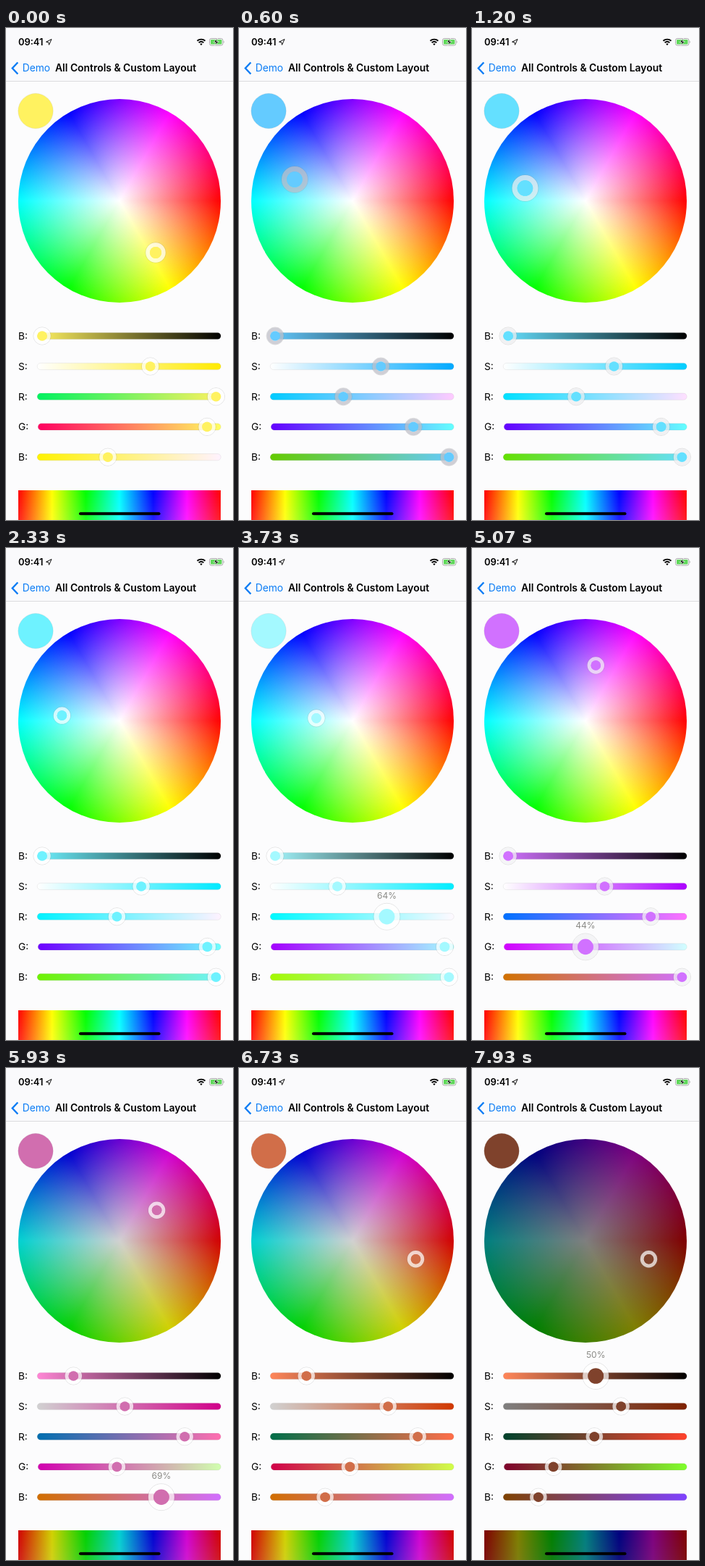
Animation of 314x679 px, one loop 8000 ms. Source, as an HTML page:

```html
<!DOCTYPE html>
<html lang="en">
<head>
<meta charset="utf-8">
<title>Colour controls</title>
<style>
  html, body { margin: 0; width: 100%; height: 100%; overflow: hidden; background: #fcfcfd; }
  div, svg { position: absolute; }
  #wheel {
    left: 16.75px; top: 98.25px; width: 280.5px; height: 280.5px; border-radius: 50%;
    background: radial-gradient(closest-side, #fff, rgba(255, 255, 255, 0)),
      conic-gradient(from 90deg, #f00, #ff0, #0f0, #0ff, #00f, #f0f, #f00);
  }
  #palette {
    left: 16.75px; top: 638px; width: 280.5px; height: 41px;
    background: linear-gradient(rgba(255, 255, 255, 0), rgba(255, 255, 255, .12)),
      linear-gradient(90deg, #f00, #ff0, #0f0, #0ff, #00f, #f0f, #f00);
  }
  svg { left: 0; top: 0; font-family: Inter, Roboto, sans-serif; }
</style>
</head>
<body>
<div id="wheel"></div>
<div id="palette"></div>
<svg id="screen" width="314" height="679" viewBox="0 0 314 679">
  <defs id="defs"></defs>
  <rect width="314" height="73" fill="#fafafc"/>
  <text x="17" y="24" font-size="12.9" font-weight="600">09:41</text>
  <path d="M55.5 19.2 63 15.5 59.5 23.3 58.8 19.8Z" fill="none" stroke="#111" stroke-linejoin="round"/>
  <g fill="none" stroke="#000" stroke-width="1.9">
    <path d="M264.5 17.8a8 8 0 0 1 11 0M266.7 20.3a5 5 0 0 1 6.6 0"/>
    <path d="M268.3 22 270 24 271.7 22A2.6 2.6 0 0 0 268.3 22Z" fill="#000" stroke="none"/>
  </g>
  <rect x="281.5" y="14.5" width="18.5" height="9.5" rx="2.6" fill="none" stroke="#aaa"/>
  <rect x="283" y="16" width="15.5" height="6.5" rx="1.3" fill="#5fd85a"/>
  <path d="M301.3 17.5q1.6 1.7 0 3.4Z" fill="#999"/>
  <path d="M292.5 14 287.3 19.8H290.4L288.8 24.3 294.2 18.4H291.1Z" stroke="#fff" stroke-width=".7"/>
  <path d="M16.3 47.5 8.8 55.5 16.3 63.5" fill="none" stroke="#0a7cf5" stroke-width="2.4"/>
  <text x="22.7" y="60" font-size="13.8" fill="#0a7cf5">Demo</text>
  <text x="68" y="60" font-size="13.9" font-weight="600">All Controls &amp; Custom Layout</text>
  <path d="M0 73.5H314" stroke="#dcdcde"/>
  <circle id="swatch" cx="41" cy="114.5" r="24.2" stroke="#999" stroke-opacity=".25" stroke-width=".6"/>
  <rect x="101" y="668.3" width="112.5" height="4" rx="2"/>
</svg>
<script>
const DURATION = 8000;
const CENTER = { x: 157, y: 238.5 }, RADIUS = 140.25;
const TRACK_END = 297.2;
const byId = id => document.getElementById(id);
const screen = byId('screen');

function add(parent, tag, attrs) {
  const node = document.createElementNS('http://www.w3.org/2000/svg', tag);
  set(node, attrs);
  parent.append(node);
  return node;
}
function set(node, attrs) {
  for (const name in attrs) node.setAttribute(name, attrs[name]);
}

const clamp = x => Math.max(0, Math.min(1, x));
const mix = (a, b, k) => a + (b - a) * k;
const smooth = x => (x = clamp(x), x * x * (3 - 2 * x));
const css = rgb => `rgb(${rgb.map(c => Math.round(c * 255))})`;

// Piecewise linear value through [time, value] points.
function along(t, points) {
  let [t0, v0] = points[0];
  for (const [t1, v1] of points) {
    if (t < t1) return mix(v0, v1, clamp((t - t0) / (t1 - t0)));
    [t0, v0] = [t1, v1];
  }
  return v0;
}
const press = (t, down, up) => smooth((t - down) / 200) * (1 - smooth((t - up) / 130));

function toRgb(h, s, v) {
  return [5, 3, 1].map(n => {
    const k = (n + h / 60) % 6;
    return v * (1 - s * clamp(Math.min(k, 4 - k)));
  });
}
function toHsv([r, g, b]) {
  const v = Math.max(r, g, b), d = v - Math.min(r, g, b);
  const sector = !d ? 0 : v === r ? (g - b) / d + 6 : v === g ? (b - r) / d + 2 : (r - g) / d + 4;
  return [sector * 60 % 360, v ? d / v : 0, v];
}

function colorAt(t) {
  if (t < 2330) {
    const dx = along(t, [[50, 207], [600, 77], [1000, 72], [1700, 77]]) - CENTER.x;
    const dy = along(t, [[50, 310], [600, 209], [1700, 231]]) - CENTER.y;
    const hue = (Math.atan2(dy, dx) * 180 / Math.PI + 360) % 360;
    return toRgb(hue, Math.hypot(dx, dy) / RADIUS, 1);
  }
  const rgb = [
    along(t, [[2800, .43], [3730, .642], [4250, .82]]),
    along(t, [[2800, .95], [3730, .975], [4500, .975], [5070, .445], [5130, .43]]),
    along(t, [[5600, 1], [6350, .2875]])
  ];
  const dim = along(t, [[6930, 1], [7930, .605]]);
  return rgb.map(c => c * dim);
}

function makeThumb() {
  const group = add(screen, 'g', {});
  return {
    group,
    edge: add(group, 'circle', { fill: 'none', stroke: 'rgba(130,130,130,.3)', 'stroke-width': .7 }),
    ring: add(group, 'circle', { fill: 'none' }),
    core: add(group, 'circle', {})
  };
}
function placeThumb(thumb, x, y, grown, fill, ringColor) {
  const outer = mix(11.7, 18, grown), inner = mix(6.8, 10.8, grown);
  set(thumb.group, { transform: `translate(${x} ${y})` });
  set(thumb.edge, { r: outer + .4 });
  set(thumb.ring, { r: (outer + inner) / 2, 'stroke-width': outer - inner, stroke: ringColor });
  set(thumb.core, { r: inner, fill });
}

const withChannel = (rgb, i, value) => rgb.map((c, k) => k === i ? value : c);
const channel = (label, y, i, down, up) => ({
  label, y, down, up,
  value: rgb => rgb[i],
  ends: rgb => [withChannel(rgb, i, 0), withChannel(rgb, i, 1)]
});
const sliders = [
  {
    label: 'B:', y: 425, down: 6740, up: 8200, reversed: true,
    value: (rgb, hsv) => 1 - hsv[2],
    ends: (rgb, [h, s]) => [toRgb(h, s, 1), [0, 0, 0]]
  },
  {
    label: 'S:', y: 467, down: 9000, up: 9500,
    value: (rgb, hsv) => hsv[1],
    ends: (rgb, [h, s, v]) => [toRgb(h, 0, v), toRgb(h, 1, v)]
  },
  channel('R:', 508.7, 0, 2330, 4300),
  channel('G:', 550.4, 1, 4340, 5250),
  channel('B:', 592.2, 2, 5400, 6450)
];
sliders.forEach((slider, i) => {
  const gradient = add(byId('defs'), 'linearGradient', { id: 'track' + i });
  slider.stops = [0, 1].map(offset => add(gradient, 'stop', { offset }));
  add(screen, 'text', { x: 17, y: slider.y + 5, 'font-size': 13.7 }).textContent = slider.label;
  const left = slider.label === 'G:' ? 44.3 : 43.2;
  add(screen, 'rect', {
    x: left, y: slider.y - 4.6, width: TRACK_END - left, height: 9.2, rx: 4.6, fill: `url(#track${i})`,
    stroke: '#888', 'stroke-opacity': .25, 'stroke-width': .5
  });
  slider.thumb = makeThumb();
  slider.percent = add(slider.thumb.group, 'text', {
    y: -25, 'font-size': 12, fill: '#8a8a86', 'text-anchor': 'middle'
  });
});
const wheelThumb = makeThumb();

// Blue hues get a darker ring so that it stays readable.
function ringFor(hue) {
  const k = smooth((hue - 188) / 11) * clamp((300 - hue) / 100);
  const [r, g, b] = [190, 190, 198].map(c => Math.round(mix(255, c, k)));
  return `rgba(${r},${g},${b},.72)`;
}

function draw(t) {
  const rgb = colorAt(t), hsv = toHsv(rgb);
  const [hue, sat, brightness] = hsv;
  const fill = css(rgb), ring = ringFor(hue);

  byId('wheel').style.filter = byId('palette').style.filter = `brightness(${brightness})`;
  set(byId('swatch'), { fill });

  const angle = hue * Math.PI / 180;
  placeThumb(wheelThumb,
    CENTER.x + Math.cos(angle) * sat * RADIUS,
    CENTER.y + Math.sin(angle) * sat * RADIUS,
    press(t, -75, 1870), fill, ring);

  for (const slider of sliders) {
    const value = slider.value(rgb, hsv);
    const grown = press(t, slider.down, slider.up);
    slider.ends(rgb, hsv).forEach((end, i) => set(slider.stops[i], { 'stop-color': css(end) }));
    placeThumb(slider.thumb, 50 + 240.5 * value, slider.y, grown, fill, ring);
    slider.percent.textContent = Math.round((slider.reversed ? 1 - value : value) * 100) + '%';
    set(slider.percent, { opacity: grown });
  }
}

function tick() {
  draw(performance.now() % DURATION);
  requestAnimationFrame(tick);
}
tick();
</script>
</body>
</html>
```
